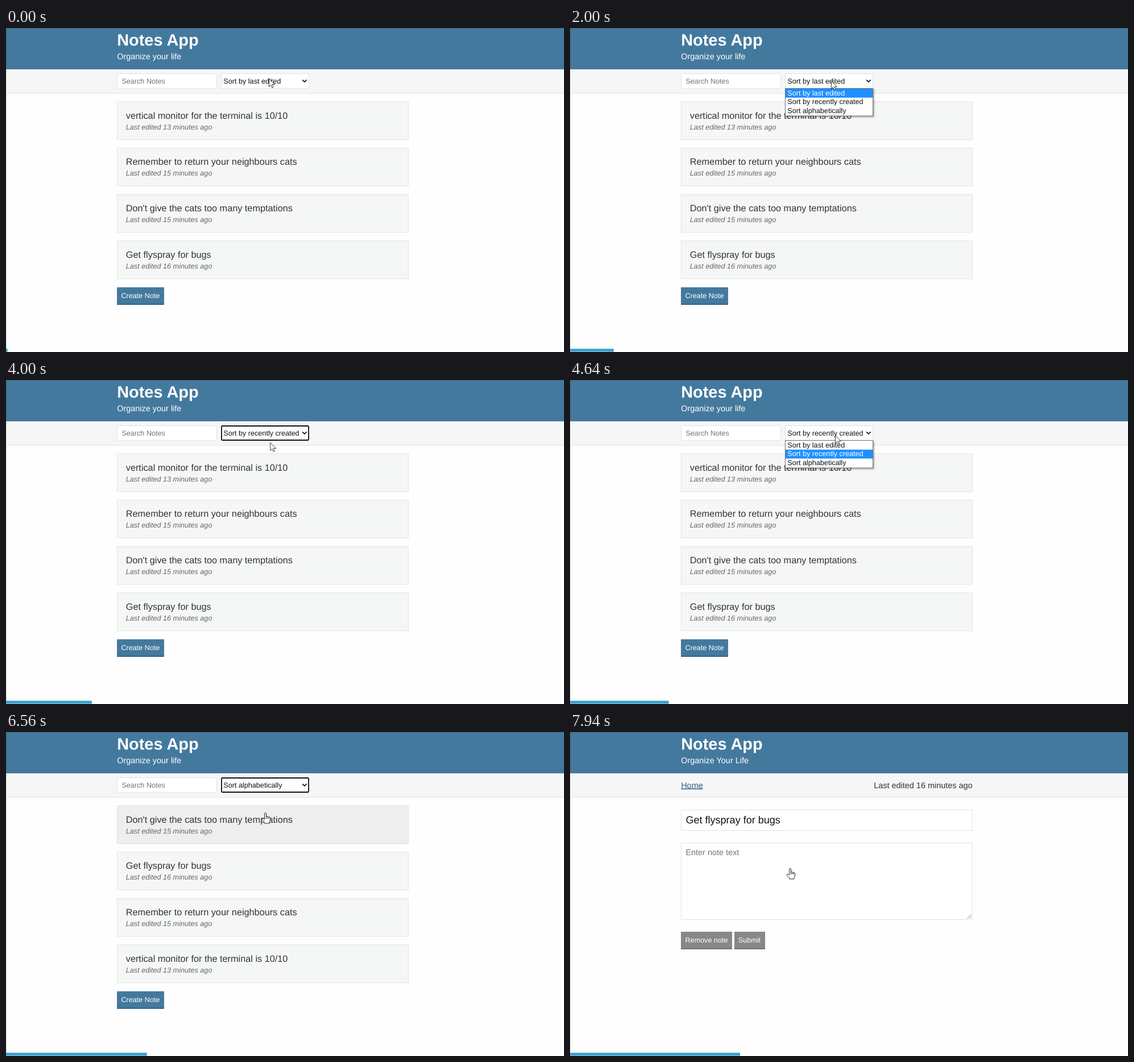
These frames come from a looping animation (981x571 px, 8000 ms). An HTML page:

```html
<!DOCTYPE html>
<html lang="en">
<head>
<meta charset="utf-8">
<title>Notes App</title>
<style>
  html, body { margin: 0; width: 100%; height: 100%; overflow: hidden; background: #fefefe; }
  svg { display: block; }
  text {
    font: 12.64px "Liberation Sans", Arial, sans-serif;
    fill: #111;
    text-rendering: geometricPrecision;
    white-space: pre;
  }
  .title { font-size: 28.9px; font-weight: bold; fill: #fff; }
  .body { font-size: 14.45px; }
  .note { font-size: 16.25px; fill: #333; }
  .meta { font-style: italic; fill: #666; }
  .hint { fill: #757575; }
  .light { fill: #fff; }
  .dark { fill: #333; }
  .box { fill: #fff; stroke: #e0e3e3; }
  .card { fill: #f5f7f7; stroke: #dfe3e3; }
  .hover { fill: #eee; stroke: #dfe3e3; }

  /* One loop is 8 s, so 1% is 80 ms. */
  .anim { animation: 8s step-end infinite; }

  #progress { animation: grow 8s steps(105, jump-none) infinite; }
  @keyframes grow { from { width: 2.8px } to { width: 299px } }

  #home { animation-name: home; }
  @keyframes home { 0% { opacity: 1 } 96.4%, 100% { opacity: 0 } }
  #editor { animation-name: editor; }
  @keyframes editor { 0% { opacity: 0 } 96.4%, 100% { opacity: 1 } }

  #unsorted { animation-name: unsorted; }
  @keyframes unsorted { 0% { opacity: 1 } 72%, 100% { opacity: 0 } }
  #sorted, #labelAlpha { animation-name: sorted; }
  @keyframes sorted { 0% { opacity: 0 } 72%, 100% { opacity: 1 } }
  #labelLast { animation-name: labelLast; }
  @keyframes labelLast { 0% { opacity: 1 } 45.6%, 100% { opacity: 0 } }
  #labelRecent { animation-name: labelRecent; }
  @keyframes labelRecent { 0% { opacity: 0 } 45.6% { opacity: 1 } 72%, 100% { opacity: 0 } }

  #focus { animation-name: focus; }
  @keyframes focus {
    0% { opacity: 0 } 45.6% { opacity: 1 } 55% { opacity: 0 }
    72% { opacity: 1 } 94%, 100% { opacity: 0 }
  }
  #menu { animation-name: menu; }
  @keyframes menu {
    0% { opacity: 0 } 17% { opacity: 1 } 45.6% { opacity: 0 }
    55% { opacity: 1 } 72%, 100% { opacity: 0 }
  }
  #pickLast { animation-name: pickLast; }
  @keyframes pickLast {
    0% { opacity: 1 } 38% { opacity: 0 } 61.7% { opacity: 1 } 63.5%, 100% { opacity: 0 }
  }
  #pickRecent { animation-name: pickRecent; }
  @keyframes pickRecent {
    0% { opacity: 0 } 38% { opacity: 1 } 61.7% { opacity: 0 }
    63.5% { opacity: 1 } 65.2%, 100% { opacity: 0 }
  }
  #pickAlpha { animation-name: pickAlpha; }
  @keyframes pickAlpha { 0% { opacity: 0 } 65.2%, 100% { opacity: 1 } }

  #hoverFirst { animation-name: hoverFirst; }
  @keyframes hoverFirst { 0% { opacity: 0 } 76% { opacity: 1 } 89.4%, 100% { opacity: 0 } }
  #hoverSecond { animation-name: hoverSecond; }
  @keyframes hoverSecond { 0% { opacity: 0 } 90.3%, 100% { opacity: 1 } }

  #hand { animation-name: hand; }
  @keyframes hand {
    0% { opacity: 0 } 76% { opacity: 1 } 89.4% { opacity: 0 } 90.3%, 100% { opacity: 1 }
  }
  #arrow { animation-name: arrow; }
  @keyframes arrow {
    0% { opacity: 1 } 76% { opacity: 0 } 89.4% { opacity: 1 } 90.3%, 100% { opacity: 0 }
  }
  #cursor { animation: move 8s linear infinite; }
  @keyframes move {
    0%, 3% { transform: translate(462px, 89px) }
    9% { transform: translate(461px, 88px) }
    13% { transform: translate(459px, 84px) }
    18%, 33.5% { transform: translate(459px, 93px) }
    38.2%, 47.5% { transform: translate(462.5px, 123px) }
    52.5%, 60.6% { transform: translate(466px, 97px) }
    65.6%, 86% { transform: translate(457px, 142px) }
    92%, 100% { transform: translate(388px, 240px) }
  }
</style>
</head>
<body>
<svg width="981" height="571" viewBox="0 0 981 571">
  <defs>
    <g id="monitor">
      <text class="note" x="210.8" y="159.5">vertical monitor for the terminal is 10/10</text>
      <text class="meta" x="210.8" y="178.5">Last edited 13 minutes ago</text>
    </g>
    <g id="neighbours">
      <text class="note" x="210.8" y="159.5">Remember to return your neighbours cats</text>
      <text class="meta" x="210.8" y="178.5">Last edited 15 minutes ago</text>
    </g>
    <g id="cats">
      <text class="note" x="210.8" y="159.5">Don't give the cats too many temptations</text>
      <text class="meta" x="210.8" y="178.5">Last edited 15 minutes ago</text>
    </g>
    <g id="bugs">
      <text class="note" x="210.8" y="159.5">Get flyspray for bugs</text>
      <text class="meta" x="210.8" y="178.5">Last edited 16 minutes ago</text>
    </g>
    <rect id="slot" x="195.5" y="130" width="511.7" height="66.7"/>
    <rect id="pick" x="379" width="153" height="15.7" fill="#1e90ff"/>
    <filter id="shadow" x="-10%" y="-20%" width="120%" height="150%">
      <feDropShadow dx="1.5" dy="1.5" stdDeviation="1.5" flood-opacity=".4"/>
    </filter>
  </defs>

  <rect width="981" height="571" fill="#fefefe"/>
  <rect y="72" width="981" height="43" fill="#f5f7f7"/>
  <path d="M0 115H981" stroke="#dfe3e3"/>
  <path d="M.5 72V571" stroke="#cdd0d0"/>
  <rect width="981" height="72.5" fill="#44799e"/>
  <path d="M0 .5H981M.5 0V72" stroke="#356582" fill="none"/>
  <path d="M0 72H981" stroke="#3d6f92"/>
  <text class="title" x="195.2" y="31">Notes App</text>

  <g id="home" class="anim">
    <text class="body light" x="195.2" y="54.6">Organize your life</text>
    <rect class="box" x="195.5" y="80.5" width="175" height="26" rx="3.5"/>
    <text class="hint" x="203.4" y="98">Search Notes</text>

    <rect class="box" x="378.5" y="80.5" width="154" height="26"/>
    <rect id="focus" class="anim" x="379" y="81" width="153" height="25" rx="1.5" fill="none" stroke="#101010" stroke-width="1.8"/>
    <text id="labelLast" class="anim" x="382.3" y="98">Sort by last edited</text>
    <text id="labelRecent" class="anim" x="382.3" y="98">Sort by recently created</text>
    <text id="labelAlpha" class="anim" x="382.3" y="98">Sort alphabetically</text>
    <path d="M521 91.3l3.8 3.8 3.8-3.8" fill="none" stroke="#111" stroke-width="1.7"/>

    <use href="#slot" class="card"/>
    <use href="#slot" class="card" y="81.7"/>
    <use href="#slot" class="card" y="163.4"/>
    <use href="#slot" class="card" y="245.2"/>
    <use id="hoverFirst" href="#slot" class="hover anim"/>
    <use id="hoverSecond" href="#slot" class="hover anim" y="81.7"/>

    <g id="unsorted" class="anim">
      <use href="#monitor"/>
      <use href="#neighbours" y="81.7"/>
      <use href="#cats" y="163.4"/>
      <use href="#bugs" y="245.2"/>
    </g>
    <g id="sorted" class="anim">
      <use href="#cats"/>
      <use href="#bugs" y="81.7"/>
      <use href="#neighbours" y="163.4"/>
      <use href="#monitor" y="245.2"/>
    </g>

    <rect x="195" y="457" width="83" height="30.5" fill="#44799e"/>
    <rect x="195" y="486" width="83" height="1.8" fill="#315f80"/>
    <text class="light" x="202.4" y="475.8">Create Note</text>

    <g id="menu" class="anim">
      <rect x="378.5" y="106.5" width="154" height="48.4" fill="#fff" stroke="#6f7377" filter="url(#shadow)"/>
      <text x="382.3" y="118.6">Sort by last edited</text>
      <text x="382.3" y="134.3">Sort by recently created</text>
      <text x="382.3" y="150">Sort alphabetically</text>
      <g id="pickLast" class="anim">
        <use href="#pick" y="107"/>
        <text class="light" x="382.3" y="118.6">Sort by last edited</text>
      </g>
      <g id="pickRecent" class="anim">
        <use href="#pick" y="122.7"/>
        <text class="light" x="382.3" y="134.3">Sort by recently created</text>
      </g>
      <g id="pickAlpha" class="anim">
        <use href="#pick" y="138.4"/>
        <text class="light" x="382.3" y="150">Sort alphabetically</text>
      </g>
    </g>
  </g>

  <g id="editor" class="anim">
    <text class="body light" x="195.2" y="54.6">Organize Your Life</text>
    <text class="body" x="195.2" y="98.6" style="fill:#35597a;text-decoration:underline">Home</text>
    <text class="body dark" x="707.6" y="98.6" text-anchor="end">Last edited 16 minutes ago</text>
    <rect class="box" x="195.5" y="137.5" width="511.7" height="36"/>
    <text x="203.4" y="161" style="font-size:18.06px">Get flyspray for bugs</text>
    <rect class="box" x="195.5" y="195.5" width="511.7" height="135"/>
    <text class="body hint" x="203.4" y="216.5">Enter note text</text>
    <path d="M698.5 328.5l7-7M702.5 328.5l3-3" stroke="#777" stroke-width=".9"/>
    <path d="M195 352h90v30.5h-90zM289 352h54v30.5h-54z" fill="#888"/>
    <path d="M195 382h90M289 382h54" stroke="#666" stroke-width="1.6"/>
    <text class="light" x="202.4" y="371.2">Remove note</text>
    <text class="light" x="295.8" y="371.2">Submit</text>
  </g>

  <rect id="progress" y="565.3" width="2.8" height="5.3" fill="#38a1c8"/>

  <g id="cursor" fill="#fff" stroke="#222" stroke-linejoin="round">
    <path id="arrow" class="anim" d="M.4.6V14.4L3.6 11.4 5.8 16.4 8 15.4 5.9 10.6H10.3Z" stroke-width=".9"/>
    <g id="hand" class="anim">
      <path d="M-2.3 12V1.9Q-2.3.5-.9.5T.6 1.9V7Q2.2 5.8 3 7.4 4.6 6.4 5.3 8 7.4 7.2 7.5 9.5V13Q7.5 15 6 16.8V19H-2.4V17.6L-6.6 12.6Q-7.4 11-6 10.4-4.8 10-3.8 11.1Z" stroke-width="1"/>
      <path d="M.6 7V11M3 7.6V11M5.3 8.2V11.2" fill="none" stroke-width=".9"/>
    </g>
  </g>
</svg>
</body>
</html>
```
